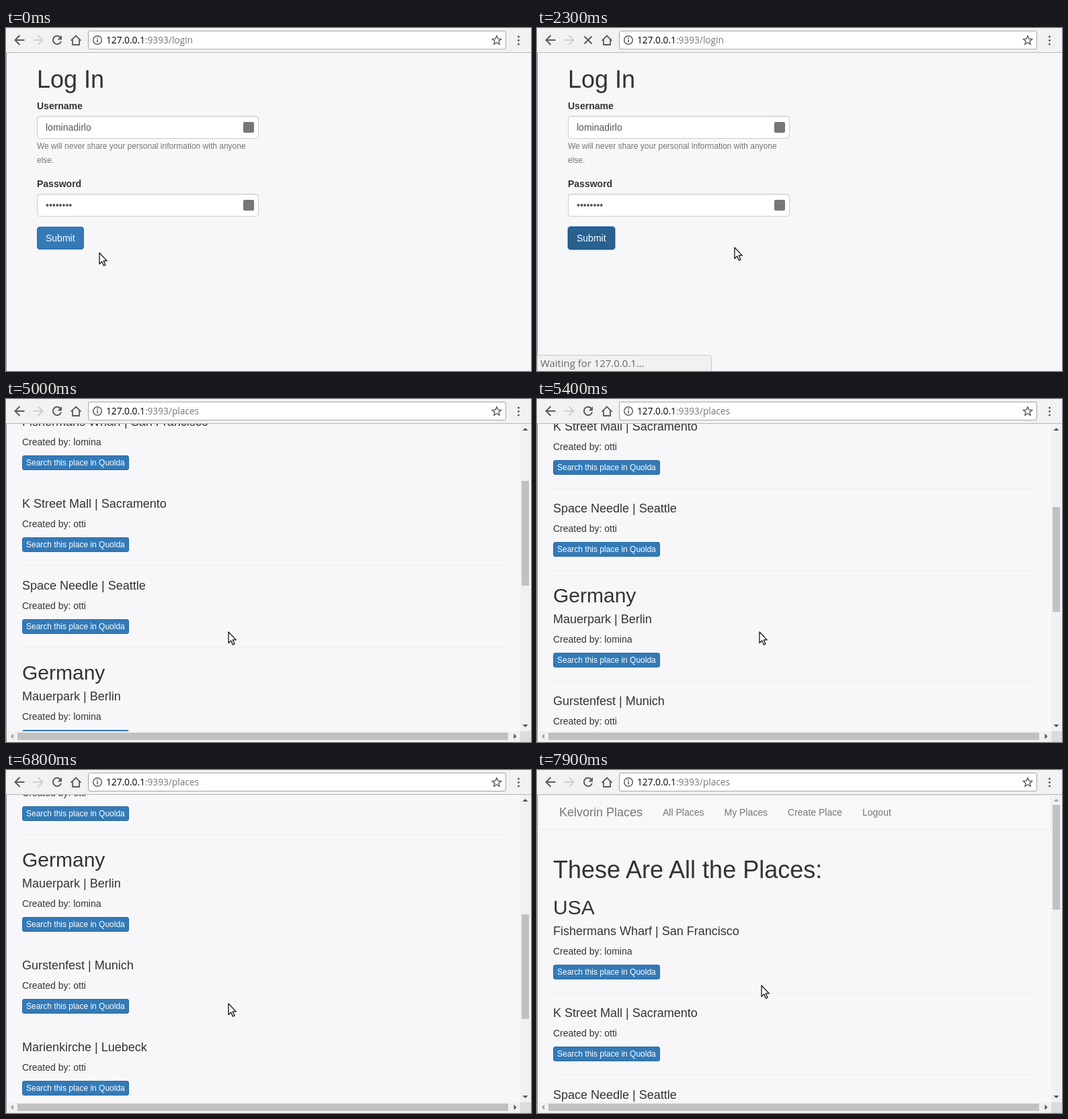
An HTML page for the animation above (8 s loop, 781 by 511 pixels).

```html
<!DOCTYPE html>
<html lang="en">
<head>
<meta charset="utf-8">
<title>Places</title>
<style>
* { box-sizing: border-box; }
html, body { margin: 0; width: 100%; height: 100%; overflow: hidden; }
body { position: relative; background: #f7f7f9; color: #333; font: 14px/20px "Liberation Sans", Arial, sans-serif; }
.abs, svg { position: absolute; }
svg { left: 0; top: 0; }
[hidden] { display: none !important; }
h1, h2, h4 { margin: 20px 0 10px; font-weight: 500; }
h1 { font-size: 36px; line-height: 39px; }
h2 { font-size: 30px; line-height: 33px; }
h4 { margin: 10px 0; font-size: 18px; line-height: 19px; }
p { margin: 0 0 10px; }
hr { margin: 20px 0; border: 0; border-top: 1px solid #eee; }

#bar { left: 0; top: 0; width: 781px; height: 37px; background: #f2f2f2; border-bottom: 1px solid #b8b8b8; }
#omni { left: 122px; top: 4px; width: 622px; height: 28px; background: #fff; border: 1px solid #a6a6a6; border-radius: 3px; }
#url { left: 149px; top: 8px; white-space: nowrap; font: 13.7px/20px "Open Sans", "Noto Sans", sans-serif; color: #777; }
#url b { font-weight: 400; color: #000; }
#edge { left: 0; top: 37px; width: 1px; height: 474px; background: #8c8c8c; }

#login { left: 46px; top: 37px; width: 330px; }
label { display: block; margin-bottom: 5px; font-weight: 700; }
.field { position: relative; height: 34px; padding: 6px 12px; background: #fff; color: #555; border: 1px solid #ccc; border-radius: 4px; box-shadow: inset 0 1px 1px rgba(0,0,0,.075); }
.field::after { content: ""; position: absolute; left: 306px; top: 8px; width: 16px; height: 16px; border-radius: 2px; background: #777; }
.group { margin-bottom: 15px; }
small { font-size: 12px; color: #777; }
.btn { display: block; width: fit-content; color: #fff; background: #337ab7; border: 1px solid #2e6da4; border-radius: 4px; white-space: nowrap; }
#submit { padding: 6px 12px; }
#submit.hot { background: #286090; border-color: #204d74; }
#submit.focus { box-shadow: 0 0 1px 1px #8ab6ee; }
.xs { padding: 1px 5px; font-size: 12px; line-height: 18px; border-radius: 3px; }

#places { left: 1px; top: 37px; width: 780px; height: 474px; overflow: hidden; }
#page { left: 1px; top: 0; width: 763px; }
#nav { position: relative; height: 52px; margin-bottom: 20px; background: #f8f8f8; border: 1px solid #e7e7e7; border-radius: 4px; color: #777; }
#nav span { position: absolute; left: 30px; top: 15px; font-size: 18px; white-space: nowrap; }
#nav div { position: absolute; left: 184px; top: 15px; display: flex; gap: 30px; white-space: nowrap; }
#list { display: flow-root; margin-left: 22px; width: 720px; }

#status { left: 0; top: 487px; width: 260px; height: 25px; padding-left: 4px; background: #f1f1f1; border: 1px solid #c9c9c9; border-radius: 0 4px 0 0; font: 14.9px/22px "Open Sans", "Noto Sans", sans-serif; color: #666; white-space: nowrap; }
</style>
</head>
<body>
<div id="login" class="abs">
  <h1>Log In</h1>
  <div class="group">
    <label>Username</label>
    <div class="field">lominadirlo</div>
    <small>We will never share your personal information with anyone<br>else.</small>
  </div>
  <div class="group">
    <label>Password</label>
    <div class="field">••••••••</div>
  </div>
  <div id="submit" class="btn">Submit</div>
</div>

<div id="places" class="abs" hidden>
  <div id="page" class="abs">
    <div id="nav"><span>Kelvorin Places</span><div><a>All Places</a><a>My Places</a><a>Create Place</a><a>Logout</a></div></div>
    <div id="list"><h1>These Are All the Places:</h1></div>
  </div>
  <svg width="780" height="474" viewBox="1 37 780 474">
    <path d="M765 37h15v458h-15zM2 495h763v16H2z" fill="#f1f1f1"/>
    <path d="M765 495h16v16h-16z" fill="#dcdcdc"/>
    <rect id="thumb" x="767" y="52" width="11" height="156" fill="#c1c1c1"/>
    <path d="M17 497h730v11H17z" fill="#c1c1c1"/>
    <path id="up" d="M768.5 47l4-4 4 4z"/>
    <path d="M768.5 485l4 4 4-4zM755.500 498.500l4 4-4 4z" fill="#505050"/>
    <path d="M11 498.500l-4 4 4 4z" fill="#a3a3a3"/>
  </svg>
</div>

<div id="bar" class="abs"></div>
<div id="omni" class="abs"></div>
<div id="url" class="abs"><b>127.0.0.1</b>:9393/<span id="path">login</span></div>
<svg width="781" height="37" fill="none" stroke="#5a5a5a" stroke-width="2">
  <path d="M27.500 18H14M20.500 11l-7 7 7 7"/>
  <path d="M40.500 18H54M47.500 11l7 7-7 7" stroke="#d0d0d0"/>
  <g id="reload"><path d="M80.600 13.700A6.200 6.200 0 1 0 82 19.800"/><path d="M83 11v6.500h-6.500z" fill="#5a5a5a" stroke="none"/></g>
  <path id="stop" d="M70.500 12.500l11 11M81.500 12.500l-11 11"/>
  <path d="M96.500 18.800L104 11.500l7.500 7.300M99 17v8h10v-8" stroke-width="1.800"/>
  <circle cx="136" cy="18" r="6.300" stroke-width="1.500"/>
  <path d="M136 17v4.500M136 14v1.700" stroke-width="1.600"/>
  <path d="M730 11.800l1.900 4.300 4.700.4-3.600 3.100 1.100 4.600-4.100-2.500-4.100 2.500 1.100-4.600-3.600-3.100 4.700-.4z" stroke-width="1.400"/>
  <path d="M762.500 13v.01M762.500 18.500v.01M762.500 24v.01" stroke-width="3" stroke-linecap="round"/>
</svg>
<div id="edge" class="abs"></div>
<div id="status" class="abs">Waiting for 127.0.0.1…</div>

<svg id="cursor" width="24" height="26" viewBox="-4 -2 24 26" fill="#fff" stroke="#111" stroke-width="1.300" stroke-linejoin="round">
  <path id="pointer" d="M0 0v16.500l3.700-3.600 2.700 6.200 2.600-1.200-2.700-6h4.900z"/>
  <path id="hand" d="M0 1.500a1.500 1.500 0 0 1 3 0V7l7 1.500q2 .5 2 2.500v3l-2 5H2l-5-6.500q0-2 2-1.500l1 1z"/>
</svg>

<script>
const $ = id => document.getElementById(id);
const LOOP = 8000, STEP = 100;

const places = [
  ["USA", ["Fishermans Wharf | San Francisco", "lomina"], ["K Street Mall | Sacramento", "otti"], ["Space Needle | Seattle", "otti"]],
  ["Germany", ["Mauerpark | Berlin", "lomina"], ["Gurstenfest | Munich", "otti"], ["Marienkirche | Luebeck", "otti"]],
  ["Greece", ["The Acropolis | Athens", "otti"], ["Thermopylae | Thermopylae", "otti"]]
];
const item = ([name, by]) =>
  `<h4>${name}</h4><p>Created by: ${by}</p><div class="btn xs">Search this place in Quolda</div><hr>`;
$("list").innerHTML += places.map(([land, ...items]) => `<h2>${land}</h2>` + items.map(item).join("")).join("");

// each key: time, values
const mouse = [
  [800, 139, 335], [1300, 92, 312], [1900, 92, 312], [2300, 294, 327],
  [4000, 294, 327], [4400, 331, 347], [5900, 331, 347], [6000, 331, 348],
  [7800, 331, 348], [7900, 334, 321]
];
const scroll = [
  [4700, 0], [5200, 318], [5300, 318], [5400, 321], [5700, 636], [5900, 636], [6000, 680],
  [6300, 798], [6400, 798], [6800, 480], [6900, 480], [7300, 162], [7400, 162], [7700, 0]
];

function at(keys, t) {
  const i = keys.findIndex(k => k[0] > t);
  if (i === 0) return keys[0].slice(1);
  if (i < 0) return keys[keys.length - 1].slice(1);
  const a = keys[i - 1], b = keys[i];
  const u = (t - a[0]) / (b[0] - a[0]), e = u * u * (3 - 2 * u);
  return a.slice(1).map((v, n) => Math.round(v + (b[n + 1] - v) * e));
}

const show = (id, on) => { $(id).style.display = on ? "" : "none"; };

function draw(t) {
  const [x, y] = at(mouse, t), [top] = at(scroll, t);
  const loaded = t >= 3800, loading = t >= 2000 && !loaded;
  const over = !loaded && x >= 46 && x < 116 && y >= 294 && y < 328;

  $("login").hidden = loaded;
  $("places").hidden = !loaded;
  $("submit").classList.toggle("hot", over || t >= 1900);
  $("submit").classList.toggle("focus", t >= 1900);
  $("path").textContent = t < 3600 ? "login" : "places";
  show("reload", !loading);
  show("stop", loading);
  $("status").style.opacity = t < 2000 ? 0 : Math.max(0, Math.min(1, (4300 - t) / 300));

  $("page").style.top = -top + "px";
  $("thumb").setAttribute("y", Math.round(52 + top * .34));
  $("up").setAttribute("fill", top ? "#505050" : "#a3a3a3");

  $("cursor").style.left = x - 4 + "px";
  $("cursor").style.top = y - 2 + "px";
  show("hand", over);
  show("pointer", !over);
}

const start = performance.now();
function tick() {
  const t = (performance.now() - start) % LOOP;
  draw(Math.floor(t / STEP) * STEP);
  requestAnimationFrame(tick);
}
tick();
</script>
</body>
</html>
```
